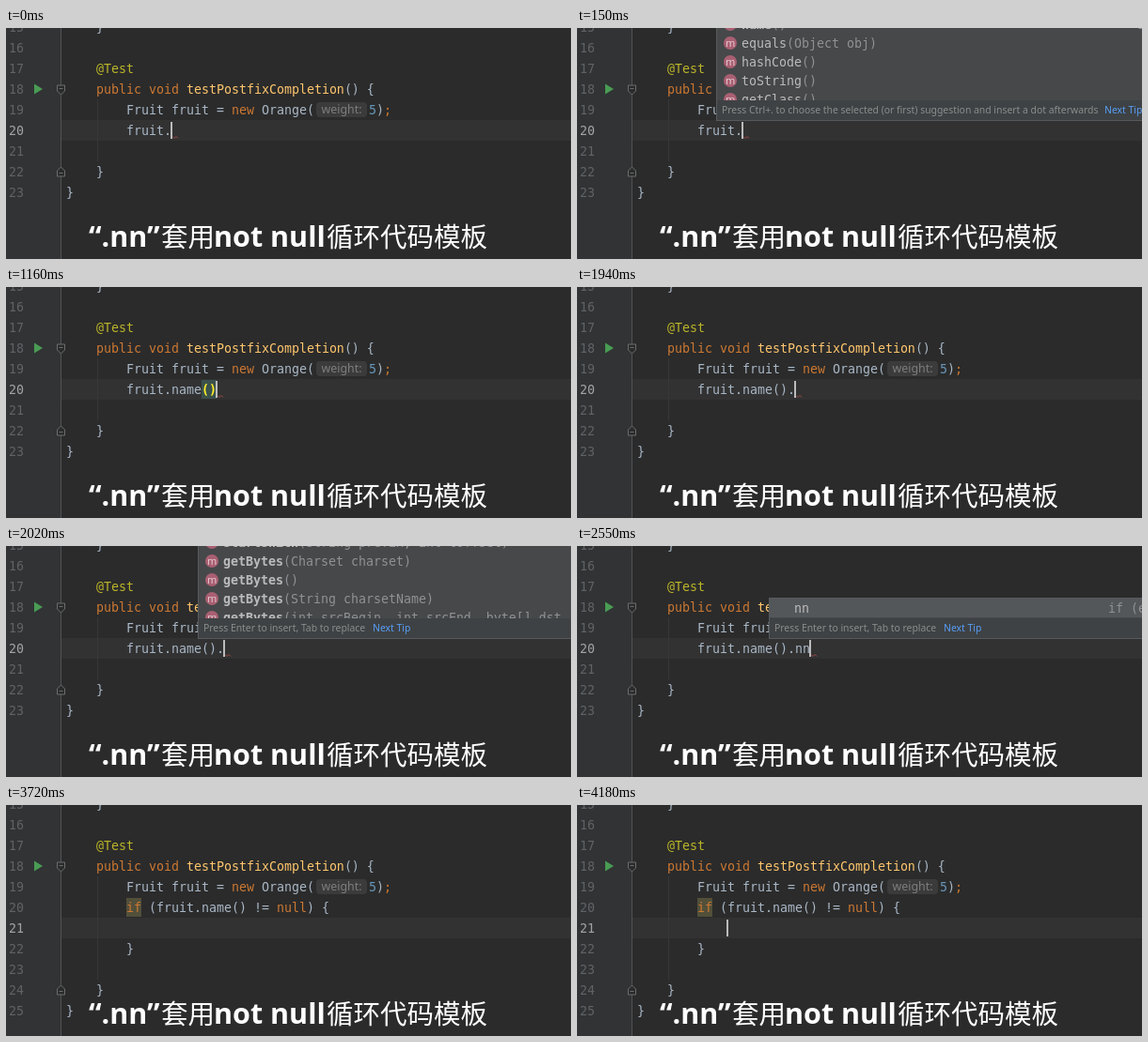
Animation of 601 by 246 pixels, one loop 4330 ms. Source, as an HTML page:

```html
<!DOCTYPE html>
<html lang="zh">
<head>
<meta charset="utf-8">
<title>Postfix completion</title>
<style>
  html, body { margin: 0; width: 100%; height: 100%; overflow: hidden; background: #2b2b2b; }
  svg { display: block; width: 601px; height: 246px; }
  text { white-space: pre; font: 13.29px "DejaVu Sans Mono", monospace; fill: #a9b7c6; }
  .num { fill: #606366; }
  .now { fill: #a4a3a3; }
  .key { fill: #cc7832; }
  .ann { fill: #bbb529; }
  .fn { fill: #ffc66d; }
  .lit { fill: #6897bb; }
  .pair { fill: #ffef28; font-weight: bold; }
  .item { fill: #bbbbbb; }
  .own { fill: #bbbbbb; font-weight: bold; }
  .hit { fill: #589df6; }
  .ownhit { fill: #589df6; font-weight: bold; }
  .dim { fill: #8f9193; }
  .icon { font: 11px "Open Sans", sans-serif; fill: #ead3d8; text-anchor: middle; }
  .inlay { font: 12.4px "Noto Sans", sans-serif; fill: #7d7d7d; }
  .tip, .link { font: 10.4px "Noto Sans", sans-serif; fill: #8c8c8c; }
  .link { fill: #589df6; }
  .latin { font: bold 30.5px "Noto Sans", sans-serif; fill: #fff; }
  .cjk { font: 500 28.5px "Noto Sans CJK SC", "Noto Sans CJK", sans-serif; fill: #fff; }
</style>
</head>
<body>
<svg id="stage" viewBox="0 0 601 246" xmlns="http://www.w3.org/2000/svg"></svg>
<script>
const LOOP = 4330, CHAR = 8, LINE = 22;
const lineTop = n => (n - 16) * LINE + 10;
const baseline = n => lineTop(n) + 16;

const rect = (x, y, w, h, fill, more = '') =>
  `<rect x="${x}" y="${y}" width="${w}" height="${h}" fill="${fill}" ${more}/>`;
const path = (d, more) => `<path d="${d}" ${more}/>`;
const text = (x, y, runs, cls = '') => {
  const body = typeof runs === 'string' ? runs
    : runs.map(([s, c = '']) => `<tspan class="${c}">${s}</tspan>`).join('');
  return `<text x="${x}" y="${y}" class="${cls}">${body}</text>`;
};
const code = (line, indent, runs) => text(64 + indent * CHAR, baseline(line), runs);

function foldMark(y, dir) {
  const outline = `M54.5 ${y - 5 * dir}h8v${6 * dir}l-4 ${4 * dir}l-4 ${-4 * dir}z`;
  return path(outline, 'fill="#2b2b2b" stroke="#6b6d6f"') +
    path(`M56.5 ${y - 1.5 * dir}h4`, 'stroke="#6b6d6f"');
}

// Gutter, surrounding code and caret row
function editor({ current, last }) {
  const guideTop = lineTop(19);
  let out = rect(0, 0, 601, 246, '#2b2b2b') + rect(0, 0, 58, 246, '#313335') +
    rect(59, lineTop(current), 542, LINE, '#323232') + rect(58, 0, 1, 246, '#505254') +
    rect(97, guideTop, 1, lineTop(last - 1) - guideTop, '#373737');
  for (let n = 15; n <= last; n++)
    out += text(3, baseline(n), String(n), n === current ? 'now' : 'num');
  return out + path('M30 59.5L39 65L30 70.5z', 'fill="#499c54"') +
    foldMark(66, 1) + foldMark(lineTop(last - 1) + 11, -1) +
    code(15, 4, '}') +
    code(17, 4, [['@Test', 'ann']]) +
    code(18, 4, [['public void ', 'key'], ['testPostfixCompletion', 'fn'], ['() {']]) +
    code(19, 8, [['Fruit fruit = '], ['new ', 'key'], ['Orange(']]) +
    rect(330, 79, 54, 16, '#3b3b3b', 'rx="4"') + text(335.5, 91, 'weight:', 'inlay') +
    text(386, baseline(19), [['5', 'lit'], [')'], [';', 'key']]) +
    code(last - 1, 4, '}') + code(last, 0, '}');
}

const caret = (line, x) => rect(x - 1, lineTop(line) + 2, 2, 18, '#bbbbbb');

function typing(s, { cursor = true, pair = false } = {}) {
  const end = 128 + s.length * CHAR;
  const runs = pair ? [[s.slice(0, -2)], ['()', 'pair']] : [[s]];
  return (pair ? rect(end - 16, 99, 16, 20, '#3b514d') : '') + code(20, 8, runs) +
    path(`M${end + 1} 115.5l2 2l2 -2l2 2`, 'fill="none" stroke="#9e4a45"') +
    (cursor ? caret(20, end) : '');
}

const icon = (x, y, pinned) =>
  `<circle cx="${x}" cy="${y}" r="7" fill="#a95f72"/>` + text(x, y + 3.5, 'm', 'icon') +
  (pinned ? path(`M${x - 9} ${y - 4}l3 -4l3 3l-4 3z`, 'fill="#a7adb1"') : '');

// rows: { runs, plain, pinned, tail, tailX }; first is the middle of the top row.
// A list cut off by the stage has its selected row out of view.
function popup(x, first, rows, tip, linkX) {
  const cutOff = first < 0;
  const top = cutOff ? -2 : first - 11;
  let list = cutOff ? '' : rect(x + 1, first - 10, 601, 20, '#54575a');
  rows.forEach((row, i) => {
    const y = first + i * 20;
    if (!row.plain) list += icon(x + 15, y, row.pinned);
    list += text(x + 27, y + 5, row.runs);
    if (row.tail) list += text(row.tailX, y + 5, row.tail, 'dim');
  });
  return rect(x, top, 610, 99 - top, '#46484a') +
    `<svg x="0" y="0" width="601" height="77">${list}</svg>` +
    rect(x, 77, 610, 22, '#3e4244') +
    rect(x + .5, top + .5, 610, 98 - top, 'none', 'stroke="#575a5c"') +
    text(x + 6, 91, tip, 'tip') + text(linkX, 91, 'Next Tip', 'link');
}

const method = (name, args = '', cls = 'item') => ({ runs: [[name, cls], [`(${args})`, 'dim']] });
const matched = (hit, rest, args = '') =>
  ({ runs: [[hit, 'hit'], [rest, 'item'], [`(${args})`, 'dim']] });
const nameRow = hit => ({
  runs: [[hit, 'ownhit'], ['name'.slice(hit.length), 'own'], ['()', 'dim']],
  tail: 'String', tailX: 596
});
const notifyAll = {
  runs: [['n', 'hit'], ['otify', 'item'], ['A', 'hit'], ['ll', 'item'], ['()', 'dim']],
  pinned: true
};
const nnRow = hit => ({
  runs: [[hit, 'item'], ['nn'.slice(hit.length), 'item']],
  plain: true, tail: 'if (expr != null)', tailX: 565
});

const dotTip = (first, rows) => popup(148, first, rows,
  'Press Ctrl+. to choose the selected (or first) suggestion and insert a dot afterwards', 561);
const enterTip = (first, rows) => popup(204, first, rows,
  'Press Enter to insert, Tab to replace', 390);

const before = editor({ current: 20, last: 23 });
const after = editor({ current: 21, last: 25 });
const block = marked => (marked ? rect(128, 99, 16, 20, '#52503a') : '') +
  code(20, 8, [['if', 'key'], [' (fruit.name() != '], ['null', 'key'], [') {']]) +
  code(22, 8, '}');

const scenes = [
  [0, before + typing('fruit.')],
  [150, before + typing('fruit.') + dotTip(-4, [
    nameRow(''), method('equals', 'Object obj'), method('hashCode'),
    method('toString'), method('getClass')])],
  [470, before + typing('fruit.n', { cursor: false }) + dotTip(-4, [
    nameRow('n'), { ...matched('n', 'otify'), pinned: true }, notifyAll,
    nnRow('n'), method('getClass')])],
  [550, before + typing('fruit.na', { cursor: false }) + dotTip(46, [nameRow('na'), notifyAll])],
  [1160, before + typing('fruit.name()', { pair: true })],
  [1940, before + typing('fruit.name().')],
  [2020, before + typing('fruit.name().') + enterTip(-4, [
    method('startsWith', 'String prefix, int toffset', 'own'),
    method('getBytes', 'Charset charset', 'own'),
    method('getBytes', '', 'own'),
    method('getBytes', 'String charsetName', 'own'),
    method('getBytes', 'int srcBegin, int srcEnd, byte[] dst, int dstBegin', 'own')])],
  [2400, before + typing('fruit.name().n') + enterTip(-4, [
    nnRow('n'), { ...matched('n', 'otify'), pinned: true }, notifyAll,
    method('length', '', 'own'), method('indexOf', 'int ch', 'own')])],
  [2550, before + typing('fruit.name().nn') + enterTip(66, [nnRow('nn')])],
  [2630, before + typing('fruit.name().nn')],
  [2710, after + block(false) + caret(21, 160)],
  [2790, after + block(true) + caret(21, 160)],
  [3720, after + block(true)],
  [4180, after + block(true) + caret(21, 160)]
];

const caption = text(88, 233, '“.nn”', 'latin') + text(165, 233, '套用', 'cjk') +
  text(221, 233, 'not null', 'latin') + text(341, 233, '循环代码模板', 'cjk');

const stage = document.getElementById('stage');
stage.innerHTML = scenes.map(([, body]) => `<g class="scene">${body}</g>`).join('') + caption;

// Each scene is fully shown from its start until the next one begins
stage.querySelectorAll('.scene').forEach((scene, i) => {
  const start = scenes[i][0];
  const end = i + 1 < scenes.length ? scenes[i + 1][0] : LOOP;
  const steps = [[start, 1], [end, 0]];
  if (start > 0) steps.unshift([0, 0]);
  if (end < LOOP) steps.push([LOOP, 0]);
  scene.animate(
    steps.map(([at, opacity]) => ({ offset: at / LOOP, opacity, easing: 'step-end' })),
    { duration: LOOP, iterations: Infinity });
});
</script>
</body>
</html>
```
